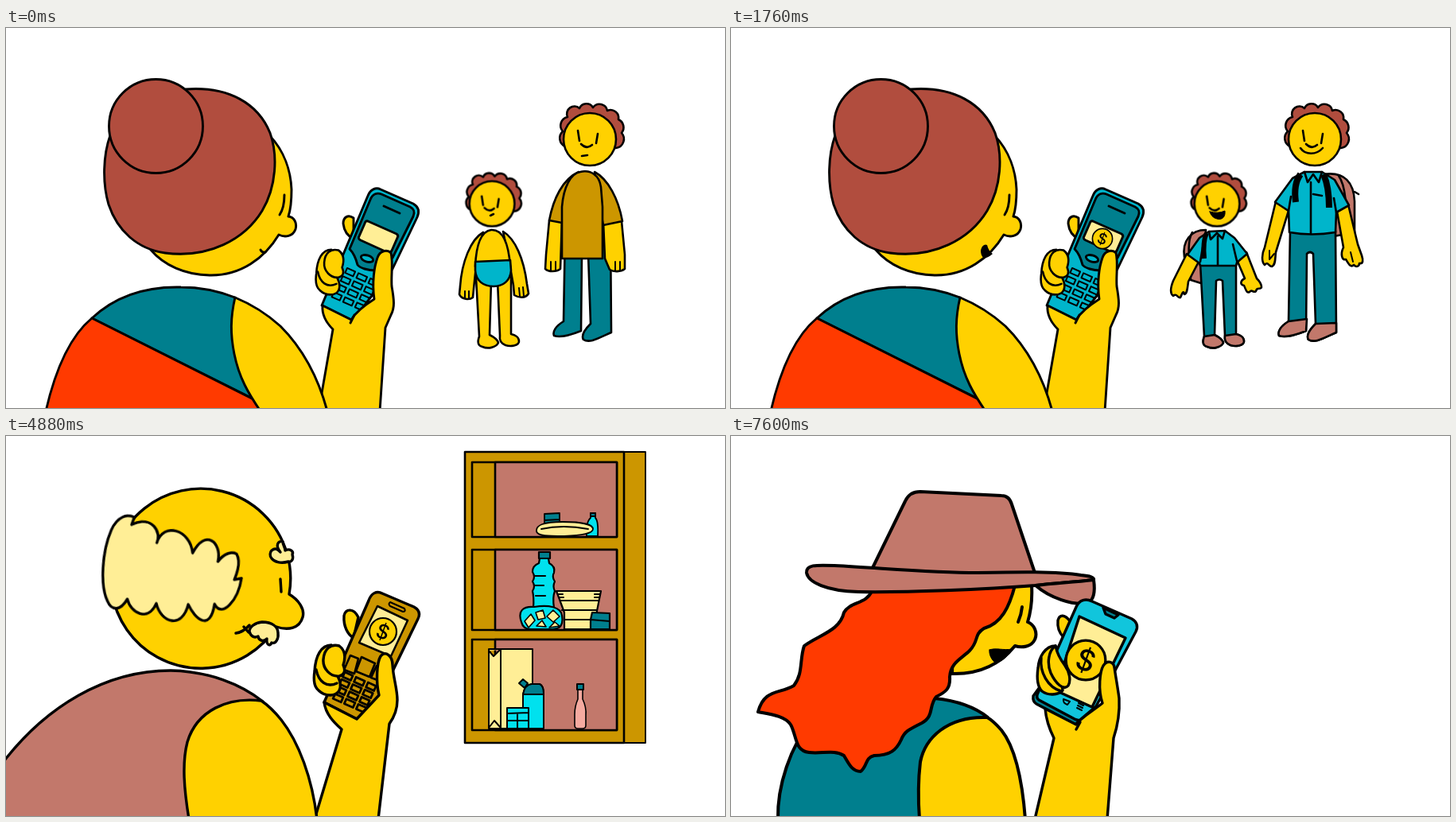
Recreate the animation shown at these times as an HTML page. Size 904 by 478 pixels, loop 8000 ms.

```html
<!DOCTYPE html>
<html lang="en">
<head>
<meta charset="utf-8">
<title>Phones and payments</title>
<style>
html, body { margin: 0; width: 100%; height: 100%; overflow: hidden; background: #fff }
svg { display: block; width: 100vw; height: 100vh; fill: none; stroke: #000; stroke-width: 2.9; stroke-linejoin: round; stroke-linecap: round }
.y { fill: #ffd100 } .t { fill: #007f8e } .c { fill: #00b5cb } .r { fill: #ff3a00 } .h { fill: #b14d3e }
.p { fill: #c2786b } .k { fill: #ffee96 } .g { fill: #cc9600 } .b { fill: #000 } .w { fill: #00e1ee }
.thin { stroke-width: 2 }
text { font: 500 25px Inter, "Liberation Sans", sans-serif; fill: #000; stroke: none; text-anchor: middle }

/* One percent of the loop is one 80 ms step. */
.sa, .sb, .sc, .coin, .kid, .man, .old, .new, .shut, .open, .low, .mid, .top, .smile, .closed, .wide {
  animation: 8s step-end infinite }
.sa { animation-name: sa } .sb { animation-name: sb } .sc { animation-name: sc }
@keyframes sa { 0% { visibility: visible } 31%, to { visibility: hidden } }
@keyframes sb { 0% { visibility: hidden } 31% { visibility: visible } 79%, to { visibility: hidden } }
@keyframes sc { 0% { visibility: hidden } 79%, to { visibility: visible } }

.coin { animation-name: coin }
@keyframes coin {
  0% { transform: scale(.35) } 1% { transform: scale(.85) } 2% { transform: scale(1.18) }
  3% { transform: scale(1.08) } 4% { transform: none } 50%, to { transform: scale(0) }
}
.man, .kid { animation-name: bounce }
.man { transform-origin: 729px 244px } .kid { transform-origin: 613px 291px }
@keyframes bounce {
  0% { transform: none } 11% { transform: scale(1.01) } 12% { transform: scale(1.02) }
  13% { transform: scale(1.035) } 14% { transform: scale(1.055) } 15% { transform: scale(1.065) }
  16% { transform: scale(1.02) } 17% { transform: scale(.957) } 18% { transform: scale(.93) }
  19% { transform: scale(.955) } 20% { transform: scale(.98) } 21% { transform: scale(.993) }
  22%, to { transform: none }
}
.old { animation-name: old } .new { animation-name: new }
@keyframes old { 0% { opacity: 1 } 18%, to { opacity: 0 } }
@keyframes new { 0% { opacity: 0 } 18%, to { opacity: 1 } }
.shut { animation-name: shut } .open { animation-name: open }
@keyframes shut { 0% { opacity: 1 } 8%, to { opacity: 0 } }
@keyframes open { 0% { opacity: 0 } 8%, to { opacity: 1 } }

.low, .mid, .top { transform-box: fill-box; transform-origin: 50% 100% }
.low { animation-name: low } .mid { animation-name: mid } .top { animation-name: top }
@keyframes low { 0% { transform: scale(0) } 56% { transform: scaleY(.2) } 57% { transform: scaleY(.65) } 58% { transform: scaleY(1.08) } 59%, to { transform: none } }
@keyframes mid { 0% { transform: scale(0) } 58% { transform: scaleY(.2) } 59% { transform: scaleY(.6) } 60% { transform: scaleY(.9) } 61%, to { transform: none } }
@keyframes top {
  0% { transform: scale(0) } 60% { transform: scaleY(.4) } 61% { transform: none } 62% { transform: scaleY(1.5) }
  63% { transform: scaleY(1.9) } 64% { transform: scaleY(2.1) } 65% { transform: scaleY(2) } 66% { transform: scaleY(1.9) } 67%, to { transform: scaleY(1.8) }
}
.smile { animation-name: smile }
@keyframes smile { 0% { opacity: 0 } 59%, to { opacity: 1 } }

.bhair, .brow, .beye, .bhead, .bbody, .barm, .tache { animation: 8s steps(6) infinite }
.bhair { animation-name: bhair; transform-origin: 220px 165px }
.brow { animation-name: brow } .beye { animation-name: beye } .bhead { animation-name: bhead }
.bbody { animation-name: bbody } .barm { animation-name: barm } .tache { animation-name: tache }
@keyframes bhair { 0%, 55% { transform: none } 61%, to { transform: translate(-10px, 2px) rotate(-4deg) } }
@keyframes brow { 0%, 55% { transform: none } 61%, to { transform: translate(-13px, -36px) } }
@keyframes beye { 0%, 55% { d: path("M352 206L349 219") } 61%, to { d: path("M345 180L346 196") } }
@keyframes bhead {
  0%, 55% { d: path("M361 222C369 228 373 240 371 250C368 262 352 266 337 261A113.5 113.5 0 1 1 361 222Z") }
  61%, to { d: path("M356 199C368 206 376 218 373 228C369 242 355 245 340 240A113 113 0 1 1 356 199Z") }
}
@keyframes bbody {
  0%, 55% { d: path("M-5 408C55 335 130 298 203 297C250 298 290 312 320 336L300 490L-5 490Z") }
  61%, to { d: path("M-5 412C50 340 125 295 207 295C255 296 295 312 323 334L300 490L-5 490Z") }
}
@keyframes barm {
  0%, 55% { d: path("M318 335C275 330 235 347 224 385C217 412 219 445 226 482L388 482C382 430 365 385 342 358C334 348 326 340 318 335Z") }
  61%, to { d: path("M321 333C279 328 240 345 228 385C221 412 224 445 230 482L391 482C385 430 368 385 346 357C338 347 330 339 321 333Z") }
}
@keyframes tache {
  0%, 55% { d: path("M341 252C328 256 317 266 319 276C324 280 328 278 330 275C330 281 336 282 340 277C341 284 347 284 347 279C351 284 354 279 352 272C354 264 350 255 341 252Z") }
  61%, to { d: path("M322 234C313 235 306 240 306 246C308 253 313 254 317 252C318 258 324 259 328 255C327 263 332 265 334 260C339 262 343 255 342 248C342 240 335 234 322 234Z") }
}

.chair, .crown, .brim, .flap, .cface, .ceye { animation: 8s steps(7) infinite }
.chair { animation-name: chair } .crown { animation-name: crown } .brim { animation-name: brim }
.flap { animation-name: flap } .cface { animation-name: cface } .ceye { animation-name: ceye }
@keyframes chair {
  0%, 88% { d: path("M160 204C152 222 130 218 127 236C125 258 103 258 83 273C77 288 82 306 75 325C62 338 40 335 34 367C50 370 70 368 78 377C86 388 84 410 97 411C115 412 135 405 147 415C153 425 160 431 170 429C176 420 172 408 185 404C200 402 210 400 216 392C220 380 215 376 235 367C255 362 248 345 254 332C262 322 275 320 273 305C270 287 277 277 285 270C300 260 293 244 305 235C322 228 335 210 341 176Z") }
  95%, to { d: path("M177 195C170 212 150 208 142 222C137 245 111 250 92 264C86 281 91 299 79 314C60 325 42 318 34 347C50 350 68 352 75 363C83 378 80 396 98 398C115 400 130 394 142 402C148 412 152 422 163 422C172 415 168 405 180 402C200 402 208 395 214 382C218 372 222 370 240 361C256 352 248 340 258 328C270 322 276 318 275 303C276 285 290 280 300 270C312 258 305 250 318 242C340 236 350 215 357 188Z") }
}
/* The open foot of the crown is hidden by the brim. */
@keyframes crown {
  0%, 88% { d: path("M158 178L193 82C195 75 199 72 207 71L310 65C318 64 322 68 325 75L364 166") }
  95%, to { d: path("M174 174L219 82C223 73 229 70 238 70L340 75C347 75 351 79 353 86L384 178") }
}
@keyframes brim {
  0%, 88% { d: path("M77 185C77 176 88 175 110 174C180 172 240 170 302 164C350 159 400 151 428 153C436 153 437 155 437 159C415 165 390 170 364 174C300 183 210 204 150 206C110 207 79 198 77 185Z") }
  95%, to { d: path("M95 172C94 162 106 162 130 163C190 166 250 172 310 172C360 171 410 170 440 175C452 176 457 178 456 181C430 184 410 185 383 188C320 193 220 197 160 196C120 195 97 184 95 172Z") }
}
@keyframes flap {
  0%, 88% { d: path("M364 174C390 170 415 165 437 159C439 175 437 185 430 189C410 193 385 185 364 174Z") }
  95%, to { d: path("M383 188C410 185 430 184 456 181C458 195 456 206 449 210C430 214 400 203 383 188Z") }
}
@keyframes cface {
  0%, 88% { d: path("M330 172L357 172C360 190 361 206 360 221C368 223 373 231 371 240C368 250 356 253 346 250C335 272 310 293 272 294L270 220Z") }
  95%, to { d: path("M350 188L378 188C379 205 377 221 373 234C381 237 386 247 382 256C378 265 366 267 357 264C340 285 315 300 278 299L280 220Z") }
}
@keyframes ceye {
  0%, 88% { d: path("M350 203Q351 212 347 221") }
  95%, to { d: path("M366 215Q365 225 361 234") }
}
.closed { animation-name: closed } .wide { animation-name: wide }
@keyframes closed { 0% { opacity: 1 } 92%, to { opacity: 0 } }
@keyframes wide { 0% { opacity: 0 } 92%, to { opacity: 1 } }
</style>
</head>
<body>
<svg viewBox="0 0 904 478" preserveAspectRatio="none">
<defs>
  <g id="coin"><circle class="y" r="17" stroke-width="2.2"/><text y="9" transform="rotate(20)">$</text></g>
  <g id="fingers" class="y">
    <path d="M409 263C396 263 389 277 388 296C386 309 388 316 393 320C401 328 415 328 419 320C422 314 419 306 417 302Z"/>
    <path d="M399 281C400 268 408 261 419 264C427 270 427 279 424 288C427 295 426 300 419 302C408 303 398 293 399 281Z"/>
    <path d="M390 294C393 309 403 317 416 311" fill="none"/>
  </g>
  <g id="row"><rect width="11" height="6.5"/><rect x="15.5" width="12" height="6.5"/><rect x="32" width="11" height="6.5"/></g>
  <g id="head">
    <path class="h" d="M703 149A11.5 11.5 0 0 1 700 130A11 11 0 0 1 706 112A9.5 9.5 0 0 1 721 101A9.5 9.5 0 0 1 738 100A10 10 0 0 1 756 104A10 10 0 0 1 770 115A11 11 0 0 1 774 132A11.5 11.5 0 0 1 767 151Z"/>
    <circle class="y" cx="734" cy="140" r="33"/>
    <path d="M719 129L721 142M744 133L742 145M723 146Q730 153 737 147"/>
  </g>
  <path id="manLegs" d="M703 255L701 369C691 375 687 382 689 387C697 390 713 385 723 381L724 284Q728 280 732 284L735 372C727 380 723 387 726 392C734 397 745 390 761 383L760 255Z"/>
  <path id="kidLegs" d="M590 296L595 388C592 396 594 400 599 401C606 404 616 402 619 396C618 391 612 388 608 386L610 318Q614 315 618 318L621 387C620 393 623 397 628 399C634 401 645 400 645 394C645 389 640 386 635 385L635 296Z"/>
</defs>

<g class="sa">
  <path class="y" d="M332 136C350 155 358 180 359 203C359 217 358 228 355 237C363 238 366 246 364 253C361 262 351 264 343 260C325 290 295 311 258 311C225 311 198 298 182 279Z"/>
  <path d="M350 210C350 220 348 229 344 235"/>
  <path class="shut" d="M320 279Q322 283 326 282"/>
  <path class="b open" stroke="none" d="M314 280C315 274 319 271 322 273C323 278 326 282 329 284C326 287 322 289 318 290C315 287 314 284 314 280Z"/>
  <path class="h" d="M131 135C122 160 121 195 129 222C140 255 165 278 200 283C255 290 300 266 322 230C340 200 342 160 332 132C317 95 280 73 226 77Z"/>
  <circle class="h" cx="188.500" cy="123.500" r="59"/>

  <path class="y" d="M437 239C430 234 424 238 424 246C425 255 430 262 437 265Z"/>
  <path class="c" d="M455 211C458 203 465 200 471 203L512 221C519 225 520 231 517 238L486 303L436 368L397 349Z"/>
  <path class="t" d="M458 216C461 208 467 207 472 209L508 225C514 228 514 232 512 237L486 289L465 305C455 305 445 302 442 298C440 290 437 283 432 278Z"/>
  <path d="M475 224L495 233"/>
  <path class="k" d="M455 243L491 259Q494 261 492 264L485 280Q483 284 479 282L446 267Q442 265 444 262L451 246Q452 242 455 243Z"/>
  <ellipse class="c" cx="454" cy="290" rx="8" ry="4" transform="rotate(18 454 290)"/>
  <g class="thin" transform="translate(429 302) rotate(24)">
    <use href="#row"/><use href="#row" y="11.500" x="-1"/><use href="#row" y="23" x="-2"/><use href="#row" y="34.500" x="-3"/>
  </g>
  <g transform="translate(467 265) scale(.74)"><g class="coin" style="animation-delay:-7.6s"><use href="#coin"/></g></g>
  <path class="y" d="M393 482L411 379C402 370 397 360 398 349L434 367C440 357 452 348 463 341C460 320 463 300 467 289C470 280 479 278 484 283C487 295 484 310 485 325C488 342 489 352 484 361L477 377L470 482Z"/>
  <path d="M433 371L438 361"/>
  <use href="#fingers" transform="translate(41 42) scale(.9)"/>

  <path class="t" d="M108 365C140 335 180 325 220 326C245 326 270 332 288 339L318 470Z"/>
  <path class="r" d="M50 482C62 430 80 388 108 365L311 467L322 482Z"/>
  <path class="y" d="M288 339C282 365 282 385 287 410C293 440 305 460 320 482L404 482C394 445 375 405 345 375C325 357 305 346 288 339Z"/>

  <g class="kid" stroke-width="2.600">
    <g class="old">
      <use href="#kidLegs" class="y"/>
      <path class="y" d="M600 257C584 266 573 295 571 325L570 335C573 342 583 342 587 339L588 328L592 290ZM625 256C640 265 651 290 655 322L657 334C653 341 644 339 639 336L638 324L632 290Z"/>
      <path class="y" d="M590 300C591 275 596 256 610 254C625 253 632 272 634 300Z"/>
      <path class="c" d="M590 294L634 292L635 305C634 318 625 325 613 325C600 325 591 318 590 305Z"/>
      <path class="thin" d="M577 331L577 340M582 331L582 340M645 327L646 337M650 326L651 337"/>
    </g>
    <g class="new">
      <path class="p" d="M597 254C578 254 567 268 570 288L575 316L594 322Z"/>
      <path d="M580 257C573 268 576 290 578 316"/>
      <use href="#kidLegs" class="t"/>
      <path class="p" d="M595 388C592 396 594 400 599 401C606 404 616 402 619 396C618 391 612 388 608 386ZM621 387C620 393 623 397 628 399C634 401 645 400 645 394C645 389 640 386 635 385Z"/>
      <path class="y" d="M573 284L556 318C552 328 552 334 556 337C561 333 561 340 565 339C568 332 569 330 570 335C574 334 574 325 575 319L588 294ZM637 294L646 315C640 318 640 323 645 324C647 328 648 334 652 332C655 328 657 334 660 331C661 325 666 330 667 326C667 321 664 318 661 315L648 282Z"/>
      <path class="c" d="M601 256L589 264L574 285L589 296L590 299L635 299L636 295L649 284L633 264L621 255Z"/>
      <path d="M590 294L593 276M636 293L631 272M612 262L612 298M601 256L603 266L611 258L618 265L621 255"/>
      <path d="M598 258Q593 268 595 290" stroke-width="6" stroke-linecap="butt"/>
    </g>
    <use href="#head" transform="translate(611 221) scale(.86) translate(-734 -140)" stroke-width="3"/>
    <path class="old" d="M609 236L613 234"/>
    <path class="b new" stroke-width="1" d="M602 231Q612 234 621 230C622 238 617 242 611 240C606 239 603 235 602 231Z"/>
  </g>

  <g class="man" stroke-width="2.600">
    <g class="new">
      <path class="p" d="M745 184C772 180 783 195 784 218L784 257L758 262Z"/>
      <path d="M764 186C773 198 774 225 774 259M784 206L789 209"/>
    </g>
    <use href="#manLegs" class="t"/>
    <g class="old">
      <path class="y" d="M683 242L679 285L678 303C682 307 692 307 697 303L699 240ZM774 243L778 285L778 303C773 307 764 307 759 304L753 290L751 244Z"/>
      <path class="thin" d="M685 294L685 305M691 294L691 305M766 294L766 305M772 294L772 305"/>
      <path class="g" d="M720 181C700 190 688 215 683 242L699 245L712 200ZM740 181C757 190 770 215 775 243L751 248L742 200Z"/>
      <path class="g" d="M699 290L699 225C701 200 710 183 722 181C735 178 746 185 748 200L750 225L750 290Z"/>
    </g>
    <g class="new">
      <path class="p" d="M701 369C691 375 687 382 689 387C697 390 713 385 723 381L724 366ZM735 372C727 380 723 387 726 392C734 397 745 390 761 383L761 371Z"/>
      <path class="y" d="M685 218L671 276C667 285 667 294 671 298C675 293 676 300 680 300C685 298 684 290 685 282L701 230ZM762 231L770 276C766 284 768 293 773 291C776 296 779 302 783 298C787 302 790 299 790 296C795 297 795 292 793 286L788 272L776 222Z"/>
      <path d="M677 280L677 291L683 284M779 282L782 294" class="thin"/>
      <path class="c" d="M721 181L706 189L684 219L701 230L702 257Q730 262 760 257L761 232L777 223L759 191L743 181Z"/>
      <path d="M701 230L704 212M761 232L758 214M729 194L729 259M721 181L725 194L732 184L739 194L743 181M732 209L743 211"/>
      <path d="M716 184Q707 196 710 219M745 184Q752 200 752 226" stroke-width="8" stroke-linecap="butt"/>
    </g>
    <use href="#head"/>
    <path class="old" d="M724 161L731 160"/>
    <path class="new" d="M716 151C722 160 736 160 744 151"/>
  </g>
</g>

<g class="sb" stroke-width="3.400">
  <g stroke-width="2.600">
    <path class="g" d="M777 20H804V386H777Z" stroke-width="1.800"/>
    <path class="g" d="M577 20H777V386H577Z"/>
    <path class="g" d="M586 33H768V127H586ZM586 143H768V244H586ZM586 256H768V370H586Z"/>
    <path class="p" d="M615 33H768V127H615ZM615 143H768V244H615ZM615 256H768V370H615Z"/>
  </g>
  <g class="top" stroke-width="1.800">
    <path class="t" d="M677 98L696 97V113H677ZM677 106L696 105"/>
    <path class="w" d="M735 97H741V103Q745 107 744 126H730Q729 108 735 103Z"/>
    <path class="t" d="M735 97H741V101H735Z"/>
    <path class="k" d="M667 120C666 112 676 108 700 108C722 108 738 111 738 117C738 123 722 125 702 126C682 126 668 126 667 120ZM673 117Q700 111 732 117"/>
  </g>
  <g class="mid" stroke-width="2.200">
    <path class="w" d="M671 154H682L683 160Q691 164 689 172Q686 177 690 183Q687 189 690 195Q687 203 689 216H663Q664 203 662 195Q666 189 662 183Q666 177 662 171Q662 163 670 160Z"/>
    <path class="t" d="M670 146H684V154H670Z"/>
    <path d="M665 176H678M665 188H676M666 201H678"/>
    <path class="k" d="M692 195H748L743 220L740 243H702V222ZM697 207H744M699 219H742M702 231H741"/>
    <path d="M694 199H700M695 203H701M740 199H747M740 203H746" class="thin"/>
    <path class="w" d="M648 234C643 220 650 214 664 215C682 212 698 215 699 226C701 238 697 243 686 243H660Q650 243 648 234Z"/>
    <path class="k" stroke-width="1.600" d="M652 233L660 224L665 232L657 241ZM666 222L675 219L678 229L669 231ZM680 227L688 219L696 227L688 234ZM667 239L674 232L679 240ZM683 241L690 234L696 239Z"/>
    <path class="t" d="M737 222L759 223V243H735V231ZM735 231L759 233"/>
  </g>
  <g class="low" stroke-width="2">
    <path class="k" d="M607 268H662V368H607ZM622 268V368M607 270L613 277L621 269M607 367L614 358L622 367"/>
    <path class="w" d="M650 325Q652 313 661 312H671Q676 314 676 325V368H650Z"/>
    <path class="t" d="M650 325Q652 313 661 312H671Q676 314 676 325ZM645 311L650 306L656 311L652 317Z"/>
    <path class="w" d="M630 342H657V368H630ZM630 349L657 348M630 358H657M643 349V368"/>
    <path fill="#f5aaa0" d="M719 318H725V331Q730 341 729 352V364Q729 368 725 368H719Q715 368 715 364V350Q715 340 719 331Z" stroke-width="1.600"/>
    <path class="t" d="M718 312H726V319H718Z"/>
  </g>

  <path class="y bhead"/>
  <g class="bhair"><path class="k" d="M176 97C168 92 155 94 146 111C132 138 127 180 135 200C139 212 150 214 160 199C163 217 184 230 196 207C200 232 226 242 236 211C243 230 261 248 269 213C277 232 299 210 305 183L296 184C302 172 305 160 301 152C296 148 285 150 277 160C284 136 264 117 246 147C245 117 212 105 202 131C209 119 199 95 172 106Z"/></g>
  <g class="brow"><path class="k" d="M347 180C352 176 355 179 358 182C351 174 355 167 361 169C361 173 364 176 364 180C370 177 375 181 373 185C375 191 372 195 368 194C358 197 350 194 347 190C344 187 345 182 347 180Z"/></g>
  <path class="beye"/>
  <path class="smile" d="M289 248Q298 247 306 238M299 240L305 247"/>
  <path class="k tache"/>
  <path class="p bbody"/>

  <path class="y" d="M443 228C437 216 427 217 425 226C424 240 430 250 437 254Z"/>
  <path class="g" d="M456 207C459 198 466 194 473 198L513 215C520 219 521 224 518 230L472 325L441 356L400 335Z"/>
  <path class="g" d="M483 209L501 217Q503 221 499 221L483 214Q480 211 483 209Z" stroke-width="2"/>
  <path class="k" d="M467 214L505 232L484 277L444 260Z" stroke-width="2.500"/>
  <path d="M433 276L443 280L438 299L425 294ZM447 278L464 286L457 303L440 296ZM466 289L474 292L467 307L459 304Z" stroke-width="2.600"/>
  <g transform="translate(426 297) rotate(24)" stroke-width="2.800">
    <use href="#row"/><use href="#row" y="10"/><use href="#row" y="20"/><use href="#row" y="30"/>
  </g>
  <g transform="translate(474 246)"><g class="coin" style="animation-delay:-4.96s"><use href="#coin"/></g></g>
  <path class="y" d="M388 482L422 369C412 360 402 350 400 335L441 356L469 326C465 310 466 285 471 277C477 269 486 277 486 288C487 305 492 318 492 332C492 346 487 355 482 362L468 482Z"/>
  <use href="#fingers"/>
  <path class="y barm"/>
</g>

<g class="sc" stroke-width="4">
  <path class="y cface"/>
  <path class="ceye"/>
  <path class="closed" d="M329 263Q330 268 335 268"/>
  <path class="b wide" stroke-width="1" d="M325 269C333 266 343 270 353 268C349 276 342 283 333 286C328 282 324 275 325 269Z"/>
  <path class="t" d="M59 482C58 440 75 390 100 360L256 330C285 333 308 342 323 354L240 482Z"/>
  <path class="y" d="M322 354C272 352 244 380 238 410C235 435 235 455 237 482L370 482C366 430 356 390 340 370C333 362 328 357 322 354Z"/>
  <path class="r chair"/>
  <path class="p crown"/>
  <path class="p brim"/>
  <path class="p flap"/>

  <g stroke-width="3.400">
    <path class="y" d="M427 234C420 224 413 224 411 232C410 242 413 248 418 253Z"/>
    <path class="t" d="M388 316L380 327Q379 334 384 337L433 363L450 346Z"/>
    <path fill="#11c5dc" d="M434 215C438 206 446 204 454 208L504 230C511 234 512 240 509 246L459 340L439 357Q436 358 432 356L387 332Q383 329 386 323Z"/>
    <path class="t" d="M468 216L471 224L482 229L487 225Z"/>
    <path class="k" d="M438 227L496 254L454 341L408 320Z"/>
    <path d="M418 331L426 334L423 338Q417 336 418 331M436 339L442 342M435 342L441 345M437 336L443 339" class="thin"/>
    <g transform="translate(446 282) scale(1.46)"><g class="coin" style="animation-delay:-.88s"><use href="#coin"/></g></g>
    <path class="y" d="M382 482L406 380C399 366 396 355 395 343L434 363C441 353 455 346 467 336C461 318 464 296 468 289C473 281 481 284 482 291C484 305 486 315 488 330C489 350 486 365 481 380L473 482Z"/>
    <path d="M434 369L439 360"/>
    <path class="y" d="M408 264C395 264 387 278 386 292C384 306 385 315 391 321C399 327 411 326 417 320L414 290Z"/>
    <path class="y" d="M408 264C399 270 397 286 402 298C408 311 418 321 424 314C428 307 425 296 420 289C414 281 410 274 408 264Z"/>
    <path d="M390 279C388 297 398 316 415 321"/>
  </g>
</g>
</svg>
</body>
</html>
```
